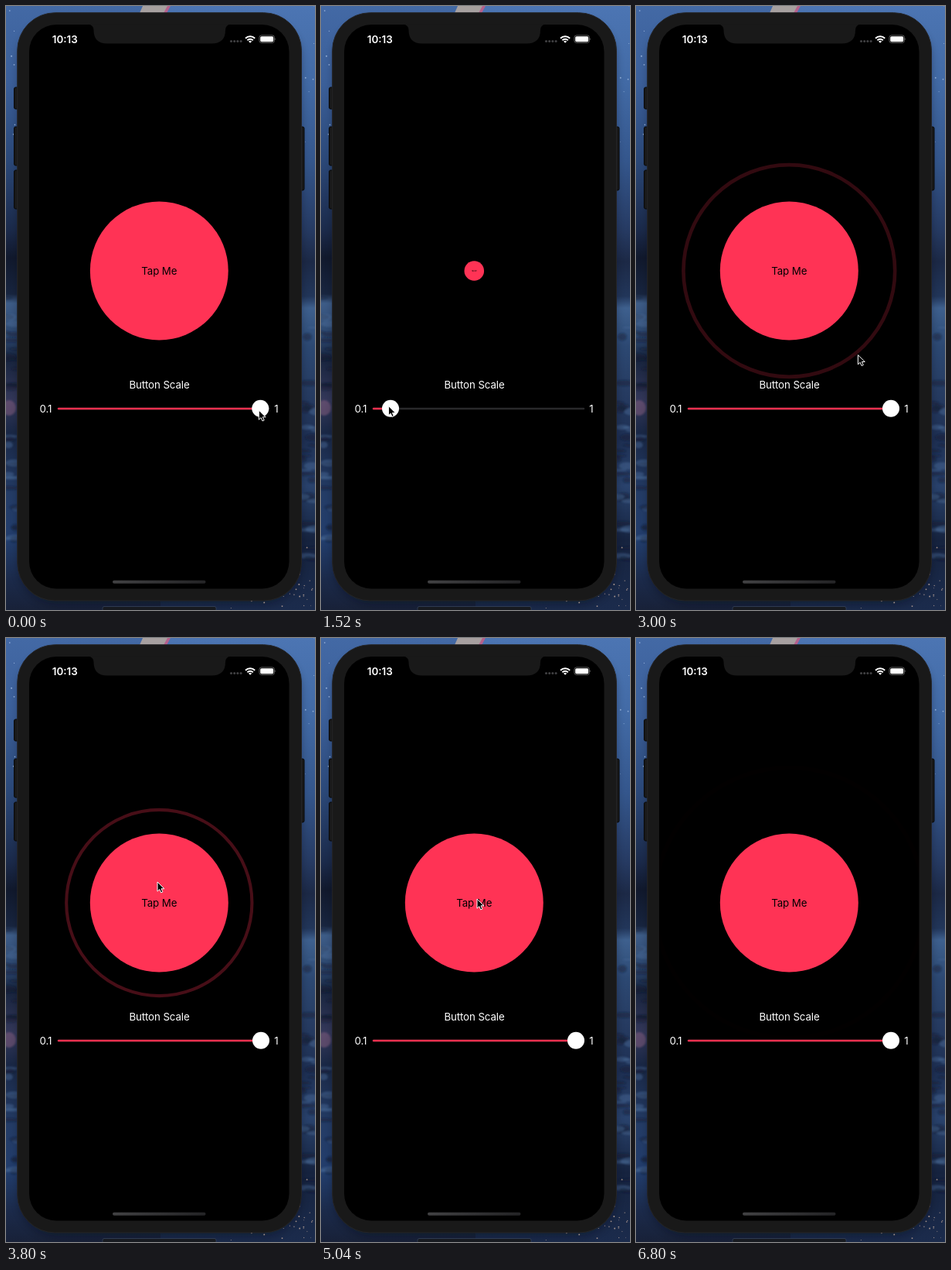
An HTML page that plays this animation: 400x780 px, repeating every 6840 ms.

```html
<!DOCTYPE html>
<html lang="en">
<head>
<meta charset="utf-8">
<title>Button scale</title>
<style>
  html, body { margin: 0; width: 100%; height: 100%; overflow: hidden; background: #1d2d50; }
  svg { display: block; width: 400px; height: 780px; }
  text { font: 13.3px Inter, Roboto, sans-serif; letter-spacing: -.1px; fill: #fff; }
  .mid { text-anchor: middle; }
  .time { font-size: 13.4px; font-weight: 600; letter-spacing: 0; }
</style>
</head>
<body>
<svg viewBox="0 0 400 780" xmlns="http://www.w3.org/2000/svg">
  <defs>
    <linearGradient id="skyL" x2="0" y2="1"></linearGradient>
    <linearGradient id="skyR" x2="0" y2="1"></linearGradient>
    <linearGradient id="bar"><stop stop-color="#414143"/><stop offset="1" stop-color="#242426"/></linearGradient>
    <filter id="soft" x="-20%" y="-20%" width="140%" height="140%"><feGaussianBlur stdDeviation="6"/></filter>
    <filter id="haze" x="-50%" y="-50%" width="200%" height="200%"><feGaussianBlur stdDeviation="1.2"/></filter>
    <clipPath id="screen"><rect x="30" y="24" width="336.500" height="728.500" rx="35"/></clipPath>
  </defs>

  <rect width="200" height="780" fill="url(#skyL)"/>
  <rect x="200" width="200" height="780" fill="url(#skyR)"/>
  <g id="clouds" filter="url(#haze)"></g>
  <rect x="17" y="18" width="364" height="754" rx="50" fill="#050914" opacity=".4" filter="url(#soft)"/>
  <path d="M177 0H212L207 9H173Z" fill="#a7a0a0"/>
  <path d="M209 0H213L208 9H204Z" fill="#b5618c"/>
  <g id="specks"></g>
  <rect x="125" y="775.500" width="147" height="6" rx="2" fill="#171a20" stroke="#41506a" stroke-width=".6"/>

  <g fill="#191919" stroke="#080808" stroke-width="1">
    <rect x="10.500" y="105" width="8" height="28" rx="2"/>
    <rect x="10.500" y="156" width="8" height="50" rx="2"/>
    <rect x="10.500" y="212" width="8" height="50" rx="2"/>
    <rect x="378" y="156" width="8" height="82" rx="2"/>
  </g>
  <rect x="14.700" y="8.700" width="367.800" height="759.300" rx="49" fill="#191919" stroke="#252527" stroke-width="1"/>
  <rect x="30" y="24" width="336.500" height="728.500" rx="35"/>

  <g clip-path="url(#screen)">
    <circle id="ring" cx="198.300" cy="342" fill="none" stroke="#ff3355"/>
    <g id="button">
      <circle r="89.500" fill="#ff3355"/>
      <text class="mid" y="5" style="fill:#000">Tap Me</text>
    </g>
    <text class="mid" x="198.500" y="494">Button Scale</text>
    <text x="43.500" y="525">0.1</text>
    <text x="347.300" y="525">1</text>
    <path d="M68 520H340" stroke="#29292b" stroke-width="2.500" stroke-linecap="round"/>
    <path id="fill" stroke="#ee304f" stroke-width="2.500" stroke-linecap="round"/>
    <circle id="thumb" cy="519.700" r="11" fill="#fff"/>
    <rect x="138" y="741.800" width="120.500" height="4" rx="2" fill="url(#bar)"/>
    <text class="time" x="59.800" y="47.500">10:13</text>
    <g fill="#414143">
      <circle cx="291.500" cy="45.500" r="1.500"/><circle cx="295.700" cy="45.500" r="1.500"/>
      <circle cx="299.900" cy="45.500" r="1.500"/><circle cx="304.100" cy="45.500" r="1.500"/>
    </g>
    <g fill="none" stroke="#fff" stroke-width="2">
      <path d="M310 41.700A8.600 8.600 0 0 1 322.200 41.700"/>
      <path d="M312.400 44.200A5.200 5.200 0 0 1 319.800 44.200"/>
    </g>
    <path d="M316.100 47.800L314 45.700A3 3 0 0 1 318.200 45.700Z" fill="#fff"/>
    <rect x="327.900" y="37.900" width="19.600" height="9.600" rx="2.800" fill="none" stroke="#777" stroke-width=".8"/>
    <rect x="329.200" y="39.200" width="17" height="7" rx="1.600" fill="#fff"/>
    <path d="M348.500 41.200Q350 42.700 348.500 44.200Z" fill="#777"/>
  </g>
  <path d="M106 23.500H291Q284 24.500 284 31V31Q284 48.500 266 48.500H131Q113.500 48.500 113.500 31Q113.500 24.500 106 23.500Z" fill="#191919"/>

  <path id="cursor" d="M0 0V12.200L2.800 9.600L4.700 13.900L6.900 12.900L5 8.800H8.900Z" fill="#000" stroke="#fff" stroke-width="1" stroke-linejoin="round"/>
</svg>

<script>
const LOOP = 6840, LAG = 80;
const PULSE = { start: 33, every: 896, length: 504 };
const $ = id => document.getElementById(id);
const NS = 'http://www.w3.org/2000/svg';

function add(parent, tag, attrs) {
  const el = document.createElementNS(NS, tag);
  for (const k in attrs) el.setAttribute(k, attrs[k]);
  parent.append(el);
}

function sky(id, stops) {
  for (const [y, color] of stops)
    add($(id), 'stop', { offset: y / 780, 'stop-color': color });
}
sky('skyL', [[0, '#4369a5'], [100, '#3b5f99'], [200, '#2b4878'], [290, '#1b2a4a'],
  [325, '#11192d'], [372, '#18253f'], [384, '#3d5c87'], [430, '#2a446b'], [455, '#17243e'],
  [510, '#34385a'], [550, '#1a2846'], [630, '#243c66'], [690, '#223d6c'], [740, '#1b2a4a'],
  [780, '#182138']]);
sky('skyR', [[0, '#4c75b3'], [100, '#426aa5'], [200, '#34568c'], [290, '#263a62'],
  [330, '#1c2946'], [375, '#22365a'], [390, '#3e608e'], [440, '#2c4872'], [500, '#263b61'],
  [560, '#1e3054'], [620, '#29426c'], [690, '#16233f'], [780, '#1b2b4c']]);

let seed = 7;
const rand = () => (seed = seed * 16807 % 2147483647) / 2147483647;

// Flat streaks of dark and light cloud on both sides.
for (let i = 0; i < 60; i++) {
  add($('clouds'), 'ellipse', {
    cx: i % 2 ? 382 + rand() * 20 : rand() * 16, cy: 375 + rand() * 340,
    rx: 5 + rand() * 9, ry: 1 + rand() * 4,
    fill: rand() < .6 ? '#111b33' : '#5072a0', opacity: .4
  });
}
add($('clouds'), 'ellipse', { cx: 4, cy: 519, rx: 9, ry: 10, fill: '#79587c', opacity: .6 });

for (let i = 0; i < 80; i++) {
  const low = i > 12;
  add($('specks'), 'circle', {
    cx: low ? 290 + rand() * 110 : i % 2 ? 386 + rand() * 14 : rand() * 12,
    cy: low ? 695 + rand() * 83 : rand() * 280,
    r: .4 + rand() * .7, fill: low ? '#d3b6a4' : '#a9c3e6', opacity: .75
  });
}

// Rows are [time, ...values]; each stretch eases in and out.
function along(rows, t) {
  if (t <= rows[0][0]) return rows[0].slice(1);
  const i = rows.findIndex(r => r[0] > t);
  if (i < 0) return rows[rows.length - 1].slice(1);
  const [a, b] = [rows[i - 1], rows[i]];
  const u = (t - a[0]) / (b[0] - a[0]);
  const e = u * u * (3 - 2 * u);
  return a.slice(1).map((v, k) => v + (b[k + 1] - v) * e);
}

const slide = [[0, 329.3], [632, 329.5], [1440, 90], [1567, 90], [2627, 330]];
const grip = [[0, -2, 522], [880, -5, 519], [2200, 0, 514]];
const travel = [[2700, 330, 514], [3500, 196, 315], [3900, 196, 315], [4600, 202, 337],
  [5450, 202, 337], [6120, 357, 32], [6400, 410, -40]];

const thumbX = t => along(slide, t)[0];
const scaleAt = t => Math.min(1, .1 + .9 * (thumbX(t) - 78) / 251.5);

function pointer(t) {
  if (t >= travel[0][0]) return along(travel, t);
  const [dx, y] = along(grip, t);
  return [thumbX(t) + dx, y];
}

function draw(t) {
  const x = thumbX(t);
  $('thumb').setAttribute('cx', x);
  $('fill').setAttribute('d', `M68 520H${x}`);
  $('button').setAttribute('transform', `translate(198.300 342) scale(${scaleAt(t - LAG)})`);
  $('cursor').setAttribute('transform', `translate(${pointer(t)})`);

  const phase = (t - PULSE.start + PULSE.every) % PULSE.every;
  const p = Math.min(1, phase / PULSE.length);
  $('ring').setAttribute('r', 88 * (1 + p));
  $('ring').setAttribute('stroke-width', 3 * (1 + p));
  $('ring').setAttribute('opacity', .44 * (1 - p));
}

const begin = performance.now();
function tick() {
  draw((performance.now() - begin) % LOOP);
  requestAnimationFrame(tick);
}
tick();
</script>
</body>
</html>
```
